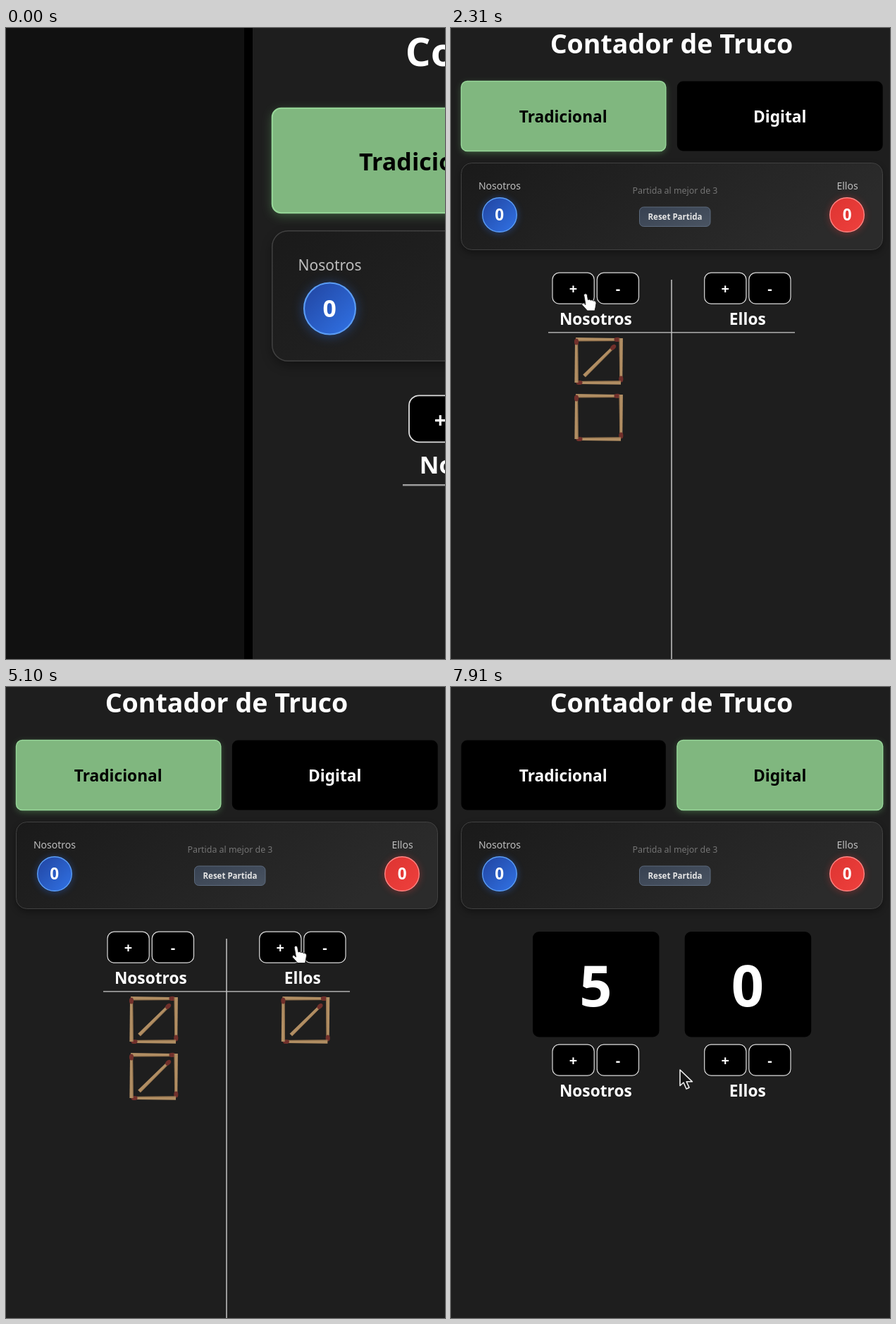
These frames come from a looping animation (623 px wide and 895 px high, 7.99 s). An HTML page:

```html
<!DOCTYPE html>
<html lang="es">
<head>
<meta charset="utf-8">
<title>Contador</title>
<style>
html, body { margin: 0; width: 100%; height: 100%; overflow: hidden; background: #1e1e1e; }
svg { display: block; width: 100%; height: 100%; }
text { font-family: "Noto Sans", "Open Sans", sans-serif; text-anchor: middle; fill: #fff; font-weight: 600; }
.small { font-size: 14px; font-weight: 400; fill: #bebebe; }
.label { font-size: 22.7px; }
.sign { font-size: 20px; font-weight: 700; }
.big { font-size: 81px; font-weight: 700; }
</style>
</head>
<body>
<svg id="stage" viewBox="0 0 623 895" preserveAspectRatio="xMinYMin slice">
  <defs>
    <linearGradient id="card" x1="0" y1="0" x2="1" y2="0.3">
      <stop offset="0" stop-color="#1a1a1a"/><stop offset="1" stop-color="#2b2b2b"/>
    </linearGradient>
    <linearGradient id="blue" x1="0" y1="0" x2="1" y2="1">
      <stop offset="0" stop-color="#2144a0"/><stop offset="1" stop-color="#3173e6"/>
    </linearGradient>
    <linearGradient id="red" x1="0" y1="0" x2="1" y2="1">
      <stop offset="0" stop-color="#dd3431"/><stop offset="1" stop-color="#ef403d"/>
    </linearGradient>
    <linearGradient id="slate" x1="0" y1="0" x2="1" y2="1">
      <stop offset="0" stop-color="#374151"/><stop offset="1" stop-color="#4a5462"/>
    </linearGradient>
    <filter id="blur" x="-30%" y="-30%" width="160%" height="160%"><feGaussianBlur stdDeviation="5"/></filter>
  </defs>
  <g id="view">
    <rect x="-12" y="-10" width="8" height="1000"/>
    <rect x="-500" y="-10" width="488" height="1000" fill="#111"/>
    <text x="313" y="35.5" font-size="37.6">Contador de Truco</text>
    <g id="tabs"></g>
    <rect x="14" y="195" width="599" height="124" rx="16" opacity=".35" filter="url(#blur)"/>
    <rect x="14.5" y="191.5" width="598" height="123" rx="15" fill="url(#card)" stroke="#414141"/>
    <text class="small" x="69" y="229">Nosotros</text>
    <text class="small" x="562.5" y="229">Ellos</text>
    <circle cx="69" cy="266" r="26" fill="#2b62cc" opacity=".4" filter="url(#blur)"/>
    <circle cx="69" cy="265" r="24.3" fill="url(#blue)" stroke="#5b9df5" stroke-width="1.4"/>
    <circle cx="562" cy="266" r="26" fill="#d83434" opacity=".35" filter="url(#blur)"/>
    <circle cx="562" cy="265" r="24.3" fill="url(#red)" stroke="#ff8583" stroke-width="1.4"/>
    <text x="68.7" y="273.3" font-size="22.5">0</text>
    <text x="562.3" y="273.3" font-size="22.5">0</text>
    <text x="318" y="235" style="font-size:12.4px;font-weight:400;fill:#747474">Partida al mejor de 3</text>
    <rect x="267.5" y="254" width="100.5" height="27.5" rx="6" fill="url(#slate)" stroke="#5c6a7d"/>
    <text x="318" y="272" style="font-size:11.5px;fill:#e6e6e6">Reset Partida</text>
    <g id="rules" stroke="#9b9b9b" stroke-width="1.7">
      <path d="M138 431.8H488"/><path d="M313 357V1000" stroke="#c4c4c4" stroke-width="1.5"/>
    </g>
    <g id="panels">
      <rect x="116" y="347" width="179.5" height="149.5" rx="9"/>
      <rect x="331.7" y="347" width="179.5" height="149.5" rx="9"/>
    </g>
    <g id="matches"></g>
    <g id="controls"></g>
    <path id="hand" fill="#fff" stroke="#161616" stroke-width=".9" stroke-linejoin="round"
      d="M-2.4 2Q0 -1.5 2.2 2L3.4 9Q5.5 7.6 7 9.6Q9 8.4 10.6 10.4Q14.8 10 15 14L14 20L13 24.5H2.5L-5.2 16Q-5.5 13.2 -2.8 13.6L0 16Z"/>
    <path id="arrow" fill="#141414" stroke="#eee" stroke-width="1.6" stroke-linejoin="round"
      d="M0 0V22.5L5 18L9 27L13 25.2L9.2 16.8H17.5Z"/>
  </g>
</svg>
<script>
const LOOP = 7990, SWITCH = 6320;
const $ = id => document.getElementById(id);
const clamp = v => Math.max(0, Math.min(1, v));
const lerp = (a, b, p) => a + (b - a) * p;
const smooth = p => p * p * (3 - 2 * p);

function add(parent, tag, attrs, text) {
  const el = document.createElementNS("http://www.w3.org/2000/svg", tag);
  for (const k in attrs) el.setAttribute(k, attrs[k]);
  if (text) el.textContent = text;
  parent.appendChild(el);
  return el;
}
const show = (el, on) => el.setAttribute("visibility", on ? "visible" : "hidden");
const mix = (a, b, p) => "rgb(" + a.map((v, i) => Math.round(lerp(v, b[i], p))) + ")";

const BLACK = [0, 0, 0], WHITE = [255, 255, 255], GREEN = [128, 183, 127], EDGE = [151, 215, 153];

// Click bursts: first click, spacing, count
const bursts = {
  us: { start: 690, step: 195, n: 10 },
  them: { start: 3010, step: 220, n: 5 },
  usDigital: { start: 6760, step: 190, n: 5 }
};
const clicks = (b, t) => Math.max(0, Math.min(b.n, Math.floor((t - b.start) / b.step) + 1));
function pressed(b, t) {
  const k = Math.round((t - b.start) / b.step), d = t - b.start - k * b.step;
  return k >= 0 && k < b.n && d > -60 && d < 40;
}

// Mode tabs
function makeTab(x, w, label, tx) {
  const box = { x, y: 75.5, width: w, height: 99, rx: 8.5 };
  const glow = add($("tabs"), "rect", { ...box, y: 78, fill: "#62a463", filter: "url(#blur)" });
  const rect = add($("tabs"), "rect", { ...box, "stroke-width": 1.4 });
  const text = add($("tabs"), "text", { x: tx, y: 134, class: "label" }, label);
  return (active, hover) => {
    glow.setAttribute("opacity", active * 0.45);
    rect.setAttribute("fill", mix(BLACK, GREEN, active));
    rect.setAttribute("stroke", mix(WHITE, EDGE, active));
    rect.setAttribute("stroke-opacity", Math.max(hover * 0.9, clamp(active * 4 - 3)));
    text.style.fill = mix(WHITE, BLACK, active);
  };
}
const setTraditional = makeTab(14.5, 290.3, "Tradicional", 159.2);
const setDigital = makeTab(320.9, 291.8, "Digital", 466.7);

// Matchsticks: four sides clockwise, then the diagonal
const sticks = [[177, 441.6, 240, 442], [241.3, 440, 241.3, 502], [241, 503.2, 178, 503], [178, 503, 178, 441], [189, 493.5, 233, 450]];
function makeMatches(dx, count) {
  return Array.from({ length: count }, (_, i) => {
    const [x1, y1, x2, y2] = sticks[i % 5], len = Math.hypot(x2 - x1, y2 - y1);
    const angle = Math.atan2(y2 - y1, x2 - x1) * 180 / Math.PI;
    const g = add($("matches"), "g", { transform: `translate(${x1 + dx} ${y1 + 80 * Math.floor(i / 5)}) rotate(${angle})` });
    add(g, "path", { d: `M0 -2.6L${len - 4} -2V2L0 2.6Z`, fill: "#b18e63" });
    add(g, "path", { d: `M0 2.2L${len - 4} 1.7`, stroke: "#8a6a47", "stroke-width": 0.9 });
    add(g, "ellipse", { cx: len - 4, cy: 0, rx: 4.6, ry: 3.1, fill: "#71302b" });
    return g;
  });
}
const usMatches = makeMatches(0, 10), themMatches = makeMatches(215.4, 5);

// Plus and minus buttons
function makeButton(cx, sign) {
  const g = add($("controls"), "g", {});
  add(g, "rect", { x: cx - 29.6, y: 347.2, width: 59.2, height: 44, rx: 9.5, stroke: "#ddd", "stroke-width": 1.2 });
  add(g, "text", { x: cx, y: 377.4, class: "sign" }, sign);
  return down => g.setAttribute("transform", down ? `translate(${cx * 0.05} ${369.2 * 0.05}) scale(.95)` : "");
}
const plusUs = makeButton(173.6, "+"), plusThem = makeButton(389.3, "+");
makeButton(236.9, "-");
makeButton(452.4, "-");
add($("controls"), "text", { x: 205.3, y: 421, class: "label" }, "Nosotros");
add($("controls"), "text", { x: 420.8, y: 421, class: "label" }, "Ellos");
const bigUs = add($("panels"), "text", { x: 205.3, y: 453.3, class: "big" }, "0");
add($("panels"), "text", { x: 420.8, y: 453.3, class: "big" }, "0");

// Pointer stops: time, x, y
const stops = [
  [0, 460, 500], [250, 460, 500], [620, 191, 376.5], [2520, 191, 376.5], [2850, 373, 366],
  [4300, 373, 366], [4950, 411.5, 367], [5150, 411.5, 367], [5850, 404, 158], [6400, 404, 158],
  [6700, 190, 537], [7640, 190, 537], [7890, 325, 543], [LOOP, 325, 543]
];
function pointer(t) {
  let i = 1;
  while (i < stops.length - 1 && t > stops[i][0]) i++;
  const a = stops[i - 1], b = stops[i], p = smooth(clamp((t - a[0]) / (b[0] - a[0])));
  return [lerp(a[1], b[1], p), lerp(a[2], b[2], p)];
}
const inside = (x, y, l, top, r, bottom) => x > l && x < r && y > top && y < bottom;

function draw(t) {
  const zoom = 1 - smooth(clamp((t - 80) / 520));
  $("view").setAttribute("transform", `translate(${356 * zoom} ${0.5 * zoom}) scale(${1 + 0.5 * zoom})`);

  const digital = t >= SWITCH, shift = digital ? 160 : 0;
  const [x, y] = pointer(t);
  const onDigital = inside(x, y, 320, 75, 613, 175);
  const change = smooth(clamp((t - SWITCH + 20) / 280));
  setTraditional(1 - change, 0);
  setDigital(change, onDigital ? 1 : 0);

  show($("rules"), !digital);
  show($("panels"), digital);
  $("controls").setAttribute("transform", `translate(0 ${shift})`);
  const us = clicks(bursts.us, t), them = clicks(bursts.them, t);
  usMatches.forEach((m, i) => show(m, !digital && i < us));
  themMatches.forEach((m, i) => show(m, !digital && i < them));
  bigUs.textContent = clicks(bursts.usDigital, t);
  plusUs(pressed(bursts.us, t) || pressed(bursts.usDigital, t));
  plusThem(pressed(bursts.them, t));

  const onButton = [144, 207, 360, 423].some(l => inside(x, y, l, 347 + shift, l + 59, 391 + shift));
  const onTab = onDigital || inside(x, y, 14, 75, 305, 175);
  const hand = onButton || onTab;
  for (const id of ["hand", "arrow"]) {
    show($(id), hand === (id === "hand"));
    $(id).setAttribute("transform", `translate(${x} ${y})`);
  }
}

const begin = performance.now();
function tick() {
  draw((performance.now() - begin) % LOOP);
  requestAnimationFrame(tick);
}
draw(0);
requestAnimationFrame(tick);
</script>
</body>
</html>
```
